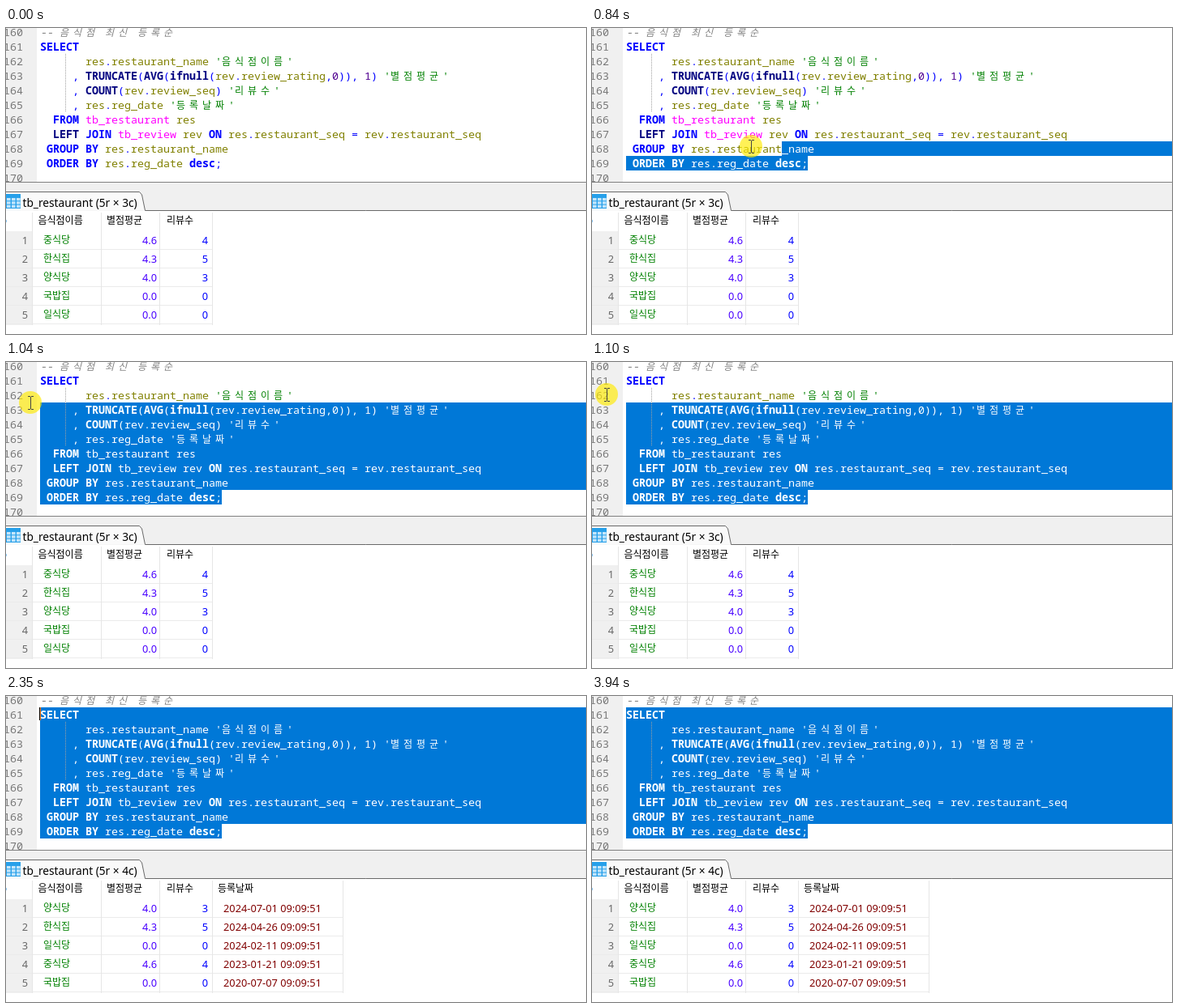
Write an HTML page with a canvas that moves like this. It is 715 by 378 pixels and loops after 4.01 s.

```html
<!DOCTYPE html>
<html lang="ko">
<head>
<meta charset="utf-8">
<title>SQL editor</title>
<style>
html, body { margin: 0; width: 100%; height: 100%; overflow: hidden; background: #fff; }
canvas { display: block; }
</style>
</head>
<body>
<canvas id="stage" width="715" height="378"></canvas>
<script>
const ctx = document.getElementById('stage').getContext('2d');
const W = 715, H = 378, LOOP = 4010;
const LEFT = 42, TOP = 14, COL = 8, ROW = 18, ANCHOR_X = 266;

const MONO = "13.33px 'Noto Sans Mono', 'DejaVu Sans Mono', monospace";
const HANGUL = "12px 'Noto Sans CJK KR', 'Noto Sans CJK', sans-serif";
const DIGITS = "12.8px 'Noto Sans', 'Open Sans', sans-serif";
const TAB = "13.7px 'Noto Sans', 'Open Sans', sans-serif";

const CODE = [
  "-- 음식점 최신 등록순",
  "SELECT",
  "       res.restaurant_name '음식점이름'",
  "     , TRUNCATE(AVG(ifnull(rev.review_rating,0)), 1) '별점평균'",
  "     , COUNT(rev.review_seq) '리뷰수'",
  "     , res.reg_date '등록날짜'",
  "  FROM tb_restaurant res",
  "  LEFT JOIN tb_review rev ON res.restaurant_seq = rev.restaurant_seq",
  " GROUP BY res.restaurant_name",
  " ORDER BY res.reg_date desc;"
];

const STYLES = [
  [/^--/, '#808080', 'italic '],
  [/^'/, '#008000', ''],
  [/^(SELECT|FROM|JOIN|ON|GROUP|BY|ORDER|desc)$/, '#0000ff', 'bold '],
  [/^(TRUNCATE|AVG|ifnull|COUNT|LEFT)$/, '#000080', 'bold '],
  [/^tb_/, '#ff00ff', ''],
  [/^\d/, '#500090', ''],
  [/^\w/, '#808000', ''],
  [/./, '#0000ff', '']
];

const HEADERS = [[39.5, '음식점이름'], [124, '별점평균'], [198, '리뷰수'], [261, '등록날짜']];
const EDGES = [32, 117, 189, 254, 415];
const BEFORE = [
  ['중식당', '4.6', '4'], ['한식집', '4.3', '5'], ['양식당', '4.0', '3'],
  ['국밥집', '0.0', '0'], ['일식당', '0.0', '0']
];
const AFTER = [
  ['양식당', '4.0', '3', '2024-07-01'], ['한식집', '4.3', '5', '2024-04-26'],
  ['일식당', '0.0', '0', '2024-02-11'], ['중식당', '4.6', '4', '2023-01-21'],
  ['국밥집', '0.0', '0', '2020-07-07']
];

// Pointer while dragging: time, x, y
const DRAG = [
  [710, 350, 183], [740, 320, 177], [780, 275, 166], [810, 234, 155],
  [840, 196, 146], [870, 156, 130], [900, 115, 114], [930, 75, 98],
  [960, 70, 88], [990, 45, 64], [1040, 30, 50], [1070, 18, 40],
  [1110, 6, 30], [1160, -4, 22], [1390, -7, 27], [1420, -11, 27], [1450, -40, 27]
];

function box(x, y, w, h, color) {
  ctx.fillStyle = color;
  ctx.fillRect(x, y, w, h);
}

function text(s, x, y, font, color, align = 'left') {
  ctx.font = font;
  ctx.fillStyle = color;
  ctx.textAlign = align;
  ctx.fillText(s, x, y);
}

function path(points, fill, stroke) {
  ctx.beginPath();
  points.forEach(([x, y]) => ctx.lineTo(x, y));
  if (fill) {
    ctx.fillStyle = fill;
    ctx.fill();
  }
  if (stroke) {
    ctx.strokeStyle = stroke;
    ctx.lineWidth = 1;
    ctx.stroke();
  }
}

function drawCode(white) {
  CODE.forEach((line, i) => {
    let x = LEFT;
    const y = TOP + (i - 1) * ROW + 14;
    for (const token of line.match(/--.*|'[^']*'|\w+|\s+|./g)) {
      const [, color, style] = STYLES.find(([rule]) => rule.test(token));
      for (const ch of token) {
        const wide = ch >= '가';
        if (ch !== ' ') text(ch, x, y, style + (wide ? HANGUL : MONO), white ? '#fff' : color);
        x += wide ? 2 * COL : COL;
      }
    }
  });
}

function drawGuides() {
  for (let y = TOP + ROW; y < TOP + 5 * ROW; y += 2) box(73, y, 1, 1, '#a0a0a0');
}

function drawSelection({ row, x }) {
  ctx.save();
  ctx.beginPath();
  for (let r = row; r <= 8; r++) {
    const from = r === row ? x : LEFT;
    const to = r === 8 ? ANCHOR_X : W;
    if (to > from) ctx.rect(from, TOP + r * ROW, to - from, ROW);
  }
  ctx.clip();
  box(0, 0, W, 190, '#0078d7');
  drawCode(true);
  ctx.restore();
}

function drawEditor(sel, caret) {
  box(0, 0, 38, 190, '#f0f0f0');
  for (let n = 0; n <= 10; n++) text(String(160 + n), -3, TOP + (n - 1) * ROW + 14, MONO, '#787878');
  drawCode(false);
  if (sel) drawSelection(sel);
  drawGuides();
  if (caret) {
    const y = TOP + sel.row * ROW;
    box(sel.x - 1, y, 1, 16, '#000');
    box(sel.x, y, 1, 16, '#ff8728');
  }
}

function drawTab(cols) {
  const edge = [[0, 202.5], [164.5, 202.5], [167.5, 206], [171.5, 225.5]];
  path([...edge, [0, 226]], '#fafafa');
  path([...edge, [W, 225.5]], null, '#696969');
  box(0, 205, 18, 18, '#27a0ea');
  for (let r = 0; r < 3; r++) {
    for (let c = 0; c < 3; c++) box(1 + c * 6, 210 + r * 4.3, 4.6, 3.3, '#c4e6fb');
  }
  text(`tb_restaurant (5r × ${cols}c)`, 20.5, 221, TAB, '#000');
}

function drawGrid(rows) {
  const cols = rows[0].length;
  const right = EDGES[cols];
  box(0, 251, 33, 116, '#f0f0f0');
  box(0, 237, 1, 3, '#90c8f0');
  for (let i = 1; i <= 5; i++) box(0, 250 + i * 23, right, 1, '#ebebeb');
  EDGES.slice(0, cols + 1).forEach(x => box(x, 228, 1, 139, '#e6e6e6'));
  HEADERS.slice(0, cols).forEach(([x, label]) => text(label, x, 242, HANGUL, '#000'));
  rows.forEach(([name, rating, count, date], i) => {
    const y = 267 + i * 23;
    text(String(i + 1), 27, y, DIGITS, '#686868', 'right');
    text(name, 46, y - 1, HANGUL, '#008000');
    text(rating, 186, y, DIGITS, '#4800ff', 'right');
    text(count, 249, y, DIGITS, '#0000ff', 'right');
    if (date) text(date + ' 09:09:51', 268, y, DIGITS, '#800000');
  });
}

function drawPointer([x, y]) {
  ctx.beginPath();
  ctx.arc(x, y, 14, 0, 2 * Math.PI);
  ctx.fillStyle = 'rgba(255, 233, 0, 0.66)';
  ctx.fill();
  if (y > 190) {
    const arrow = [[0, 0], [0, 16], [4, 12.5], [7, 18], [9, 17], [6.5, 11.5], [11, 11.5], [0, 0]];
    path(arrow.map(([dx, dy]) => [x + dx, y + dy]), '#fff', '#000');
  } else {
    const px = Math.round(x), py = Math.round(y);
    box(px, py - 7, 1, 15, '#444');
    for (const dy of [-8, 8]) {
      box(px - 3, py + dy, 3, 1, '#444');
      box(px + 1, py + dy, 3, 1, '#444');
    }
  }
}

function dragStep(t) {
  let i = -1;
  while (i + 1 < DRAG.length && DRAG[i + 1][0] <= t) i++;
  return i;
}

function pointerAt(t, step) {
  if (t < 80 || t >= 1450) return null;
  if (step >= 0) return DRAG[step].slice(1);
  const k = Math.min(1, (Math.floor((t - 80) / 30.8) + 1) / 13);
  const left = (1 - k) ** 2;
  return [358 + 345 * left, 186 + 218 * left];
}

// The selection trails the pointer by one step.
function selectionAt(step) {
  if (step < 3) return null;
  const [, x, y] = DRAG[Math.min(step - 1, 12)];
  const row = Math.max(0, Math.min(8, Math.floor((y - TOP) / ROW)));
  const col = Math.max(0, Math.round((x - LEFT) / COL));
  return { row, x: LEFT + col * COL };
}

function caretOn(t) {
  return (t >= 1160 && t < 1680) || (t >= 2170 && t < 2870) || (t >= 3420 && t < 3940);
}

function draw(t) {
  const step = dragStep(t);
  const sel = selectionAt(step);
  box(0, 0, W, H, '#fff');
  drawEditor(sel, sel && caretOn(t));
  box(0, 190, W, 36, '#f0f0f0');
  box(0, 190, W, 1, '#808080');
  if (t < 2290 || t >= 2320) {
    const rows = t < 2290 ? BEFORE : AFTER;
    drawTab(rows[0].length);
    drawGrid(rows);
  }
  const pointer = pointerAt(t, step);
  if (pointer) drawPointer(pointer);
}

const start = performance.now();
function tick() {
  draw((performance.now() - start) % LOOP);
  requestAnimationFrame(tick);
}
tick();
</script>
</body>
</html>
```
